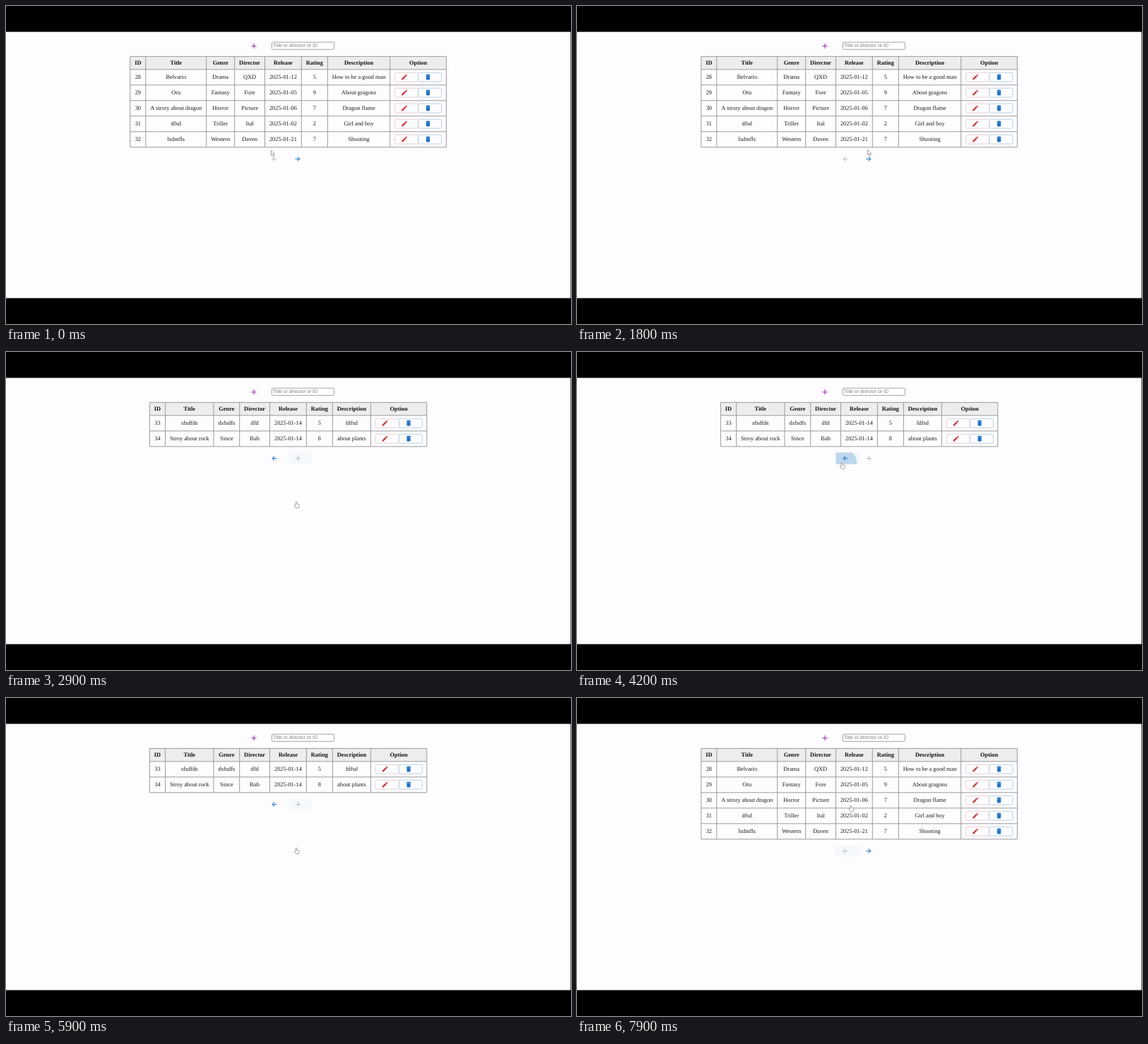
Recreate the animation shown at these times as an HTML page. Size 800 by 450 pixels, loop 8 s.

```html
<!DOCTYPE html>
<html lang="en">
<head>
<meta charset="utf-8">
<title>Movie table</title>
<style>
html, body { margin: 0; width: 100%; height: 100%; overflow: hidden; background: #000; }
svg { display: block; width: 800px; height: 450px; }
text { font: 8.35px "Liberation Serif", Tinos, serif; fill: #1c1c1c; text-anchor: middle; text-rendering: geometricPrecision; }
.head { font-weight: bold; fill: #111; }
.hint { font: 6.95px "Liberation Sans", Arimo, sans-serif; fill: #7c7c7c; text-anchor: start; }
.grid { fill: none; stroke: #9c9b9d; }
.cursor { fill: #fff; stroke: #8f8f8f; stroke-width: .8; stroke-linejoin: round; }
</style>
</head>
<body>
<svg id="stage" viewBox="0 0 800 450"></svg>
<script>
const BLUE = '#1f74c4', RED = '#c8373d', PURPLE = '#9c27b0', OFF = '#bdbcbe';
const ICONS = {
  add: 'M19 13h-6v6h-2v-6H5v-2h6V5h2v6h6v2z',
  edit: 'M3 17.25V21h3.75L17.81 9.94l-3.75-3.75L3 17.25zM20.71 7.04c.39-.39.39-1.02 0-1.41l-2.34-2.34a1 1 0 0 0-1.41 0l-1.83 1.83 3.75 3.75 1.83-1.83z',
  bin: 'M6 19c0 1.1.9 2 2 2h8c1.1 0 2-.9 2-2V7H6v12zM19 4h-3.5l-1-1h-5l-1 1H5v2h14V4z',
  back: 'M20 11H7.83l5.59-5.59L12 4l-8 8 8 8 1.41-1.41L7.83 13H20v-2z',
  next: 'M12 4l-1.41 1.41L16.17 11H4v2h12.17l-5.58 5.59L12 20l8-8z'
};
const HEADS = ['ID', 'Title', 'Genre', 'Director', 'Release', 'Rating', 'Description', 'Option'];
const PAGES = [
  {
    edges: [175.8, 197.8, 283.7, 323.7, 366.5, 418.3, 455.4, 543.7, 623.4],
    arrowY: 216.5,
    rows: [
      '28|Belvario|Drama|QXD|2025-01-12|5|How to be a good man',
      '29|Oru|Fantasy|Fore|2025-01-05|9|About gragons',
      '30|A strory about dragon|Horror|Picture|2025-01-06|7|Dragon flame',
      '31|dfsd|Triller|Ital|2025-01-02|2|Girl and boy',
      '32|lsdmfls|Western|Daven|2025-01-21|7|Shooting'
    ]
  },
  {
    edges: [203.4, 225.6, 294, 330.7, 373.5, 425.4, 462.4, 516.4, 595.8],
    arrowY: 150.5,
    rows: [
      '33|sfsdfds|dsfsdfs|dfd|2025-01-14|5|fdfsd',
      '34|Stroy about rock|Since|Bab|2025-01-14|8|about plants'
    ]
  }
];

const icon = (name, x, y, color, scale = .435) =>
  `<path d="${ICONS[name]}" fill="${color}" transform="translate(${x} ${y}) scale(${scale}) translate(-12 -12)"/>`;
const label = (s, x, y, cls = '') => `<text x="${x}" y="${y}" class="${cls}">${s}</text>`;
const box = (x, y, w, h, attrs) => `<rect x="${x}" y="${y}" width="${w}" height="${h}" ${attrs}/>`;

function table({ edges, rows }) {
  const left = edges[0], right = edges[8], top = 71.4, head = 89.8;
  const bottom = head + 22 * rows.length;
  const mid = i => (edges[i] + edges[i + 1]) / 2;
  let out = box(left, top, right - left, head - top, 'fill="#eeecef"');
  let lines = `M${left} ${top}H${right}`;
  for (const x of edges) lines += `M${x} ${top}V${bottom}`;
  for (let r = 0; r <= rows.length; r++) lines += `M${left} ${head + 22 * r}H${right}`;
  out += `<path class="grid" d="${lines}"/>`;
  HEADS.forEach((h, i) => out += label(h, mid(i), 83.4, 'head'));
  rows.forEach((row, r) => {
    const y = 100.7 + 22 * r, x = mid(7);
    row.split('|').forEach((s, i) => out += label(s, mid(i), y + 2.7));
    out += box(x - 33, y - 6.4, 33, 12.8, 'rx="2" fill="none" stroke="#e6cdd0" stroke-width=".9"');
    out += box(x + .3, y - 6.4, 33, 12.8, 'rx="2" fill="none" stroke="#b5d0e2" stroke-width=".9"');
    out += icon('edit', x - 19.4, y - .2, RED) + icon('bin', x + 14, y - .2, BLUE);
  });
  return out;
}

const stage = document.getElementById('stage');
stage.innerHTML =
  '<defs><clipPath id="clip"><rect id="clipBox" width="33.2" height="16.4" rx="2"/></clipPath></defs>' +
  box(0, 36.6, 799.4, 376.8, 'fill="#fdfcfe"') +
  icon('add', 351, 56.7, PURPLE, .52) +
  box(376.5, 51.2, 88, 10.2, 'rx="1" fill="#fff" stroke="#9b9b9b" stroke-width=".9"') +
  label('Title or director or ID', 378, 58.4, 'hint') +
  box(0, 0, 33.2, 16.4, 'id="hover" rx="2" fill="#f5f9fb"') +
  `<circle id="ripple" fill="${BLUE}" fill-opacity=".26" clip-path="url(#clip)"/>` +
  PAGES.map((p, i) => `<g id="page${i}">${table(p)}` +
    icon('back', 380, p.arrowY, i ? BLUE : OFF) +
    icon('next', 413, p.arrowY, i ? OFF : BLUE) + '</g>').join('') +
  '<path id="pointer" class="cursor" d="M0 0V7.4L1.7 5.9 2.9 8.6 4.1 8 2.9 5.4H5.1Z"/>' +
  '<path id="hand" class="cursor" d="M-.8 .8Q0-.5 .8 .8V3.4L3.6 4Q4.5 4.3 4.4 5.5L3.6 9H-.4L-2.7 5.8Q-2.6 4.7-1.5 5.1L-.8 5.8Z"/>';

const $ = id => document.getElementById(id);
const show = (id, on) => $(id).setAttribute('visibility', on ? 'visible' : 'hidden');
const set = (id, attrs) => { for (const k in attrs) $(id).setAttribute(k, attrs[k]); };

// Cursor tip: time, x, y
const PATH = [
  [0, 375.5, 204.3], [1000, 375.5, 204.3], [1750, 411.5, 203.3], [1850, 411.5, 203.3],
  [2200, 411, 211.6], [3400, 411, 211.6], [4000, 375, 156.2], [4600, 375, 156.2],
  [5400, 411, 211.6], [6050, 411, 211.6], [6550, 387.5, 151.6], [8000, 387.5, 151.6]
];
// Hovered arrow button: start, end, x
const HOVERS = [[2000, 3400, 399.8], [3850, 4600, 366.4], [5300, 6050, 399.8], [6450, 8000, 366.4]];
const SWITCHES = [2700, 4300, 5900, 7700];
const RIPPLE = 200;

function cursorAt(t) {
  const i = PATH.findIndex(p => p[0] > t);
  const [t0, x0, y0] = PATH[i - 1], [t1, x1, y1] = PATH[i];
  const u = (t - t0) / (t1 - t0), e = u * u * (3 - 2 * u);
  return [x0 + (x1 - x0) * e, y0 + (y1 - y0) * e];
}

function draw(t) {
  const page = SWITCHES.filter(s => t >= s).length % 2;
  show('page0', page === 0);
  show('page1', page === 1);

  const [x, y] = cursorAt(t);
  const hover = HOVERS.find(h => t >= h[0] && t < h[1]);
  const visible = t < 4600 || t >= 5050;
  show('pointer', visible && !hover);
  show('hand', visible && hover);
  set('pointer', { transform: `translate(${x} ${y})` });
  set('hand', { transform: `translate(${x} ${y})` });

  show('hover', hover);
  const click = SWITCHES.find(s => t < s && t >= s - RIPPLE);
  show('ripple', click);
  if (hover) {
    const spot = { x: hover[2], y: PAGES[page].arrowY - 8.2 };
    set('hover', spot);
    set('clipBox', spot);
  }
  if (click) set('ripple', { cx: x, cy: y + 1, r: 42 * (t - click + RIPPLE) / RIPPLE });
}

const start = performance.now();
function tick() {
  draw((performance.now() - start) % 8000);
  requestAnimationFrame(tick);
}
tick();
</script>
</body>
</html>
```
